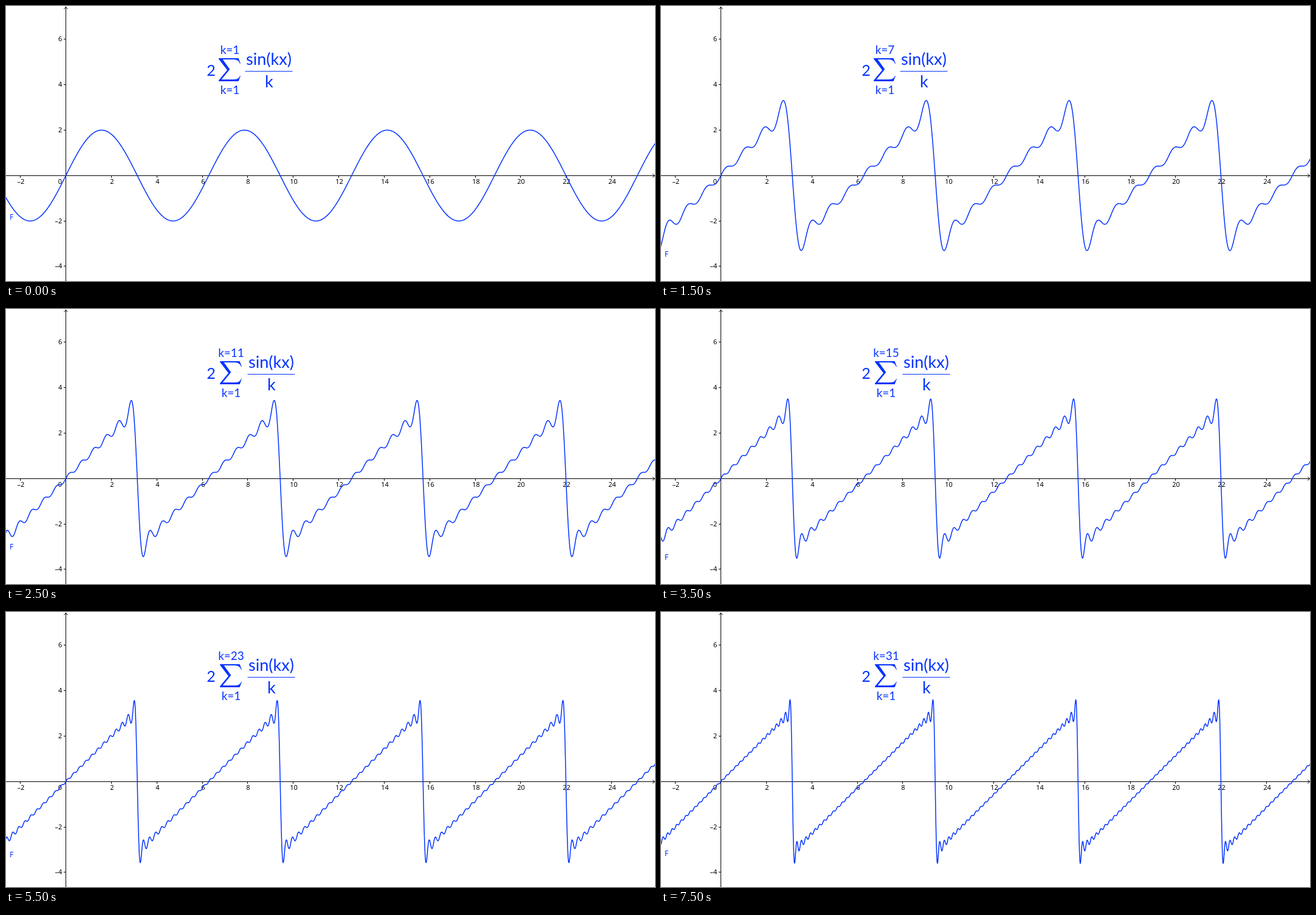
Write an HTML page with a canvas that moves like this. It is 1068x453 px and loops after 8000 ms.

```html
<!DOCTYPE html>
<html lang="en">
<head>
<meta charset="utf-8">
<title>Partial sums of a sawtooth wave</title>
<style>
  html, body { margin: 0; width: 100%; height: 100%; overflow: hidden; background: #fff; }
  canvas { display: block; width: 1068px; height: 453px; }
</style>
</head>
<body>
<canvas id="stage"></canvas>
<script>
const W = 1068, H = 453;
const STEP = 500, LOOP = 8000;
const UNIT = 37.42, X0 = 98.5, Y0 = 279.3;
const BLUE = '#0433ff', BLACK = '#000';
const AXIS_FONT = '11px "Noto Sans", "Open Sans", sans-serif';
const MATH = 'Lato, "Open Sans", sans-serif';

const canvas = document.getElementById('stage');
const ctx = canvas.getContext('2d');
const dpr = window.devicePixelRatio || 1;
canvas.width = W * dpr;
canvas.height = H * dpr;

const sigma = new Path2D(
  'M350 86H382.6L386 95H385C382.6 89.4 380 88 372 88H356.6L368.3 104.2' +
  'L354.6 121H372C380 121 383 120 385 115H386L382.6 124H350V122.6L364 105.6L350 87.2Z');

const snap = v => Math.floor(v) + 0.5;

function text(str, x, y, font, color, align = 'center') {
  ctx.font = font;
  ctx.fillStyle = color;
  ctx.textAlign = align;
  ctx.fillText(str, x, y);
}

function stroke(color, width, ...points) {
  ctx.strokeStyle = color;
  ctx.lineWidth = width;
  ctx.beginPath();
  points.forEach(([x, y]) => ctx.lineTo(x, y));
  ctx.stroke();
}

// Partial sum 2 * sum (-1)^(k+1) sin(kx) / k, which tends to x on (-pi, pi)
function wave(x, n) {
  let sum = 0;
  for (let k = 1; k <= n; k++) sum += (k % 2 ? 2 : -2) * Math.sin(k * x) / k;
  return sum;
}

const waveY = (px, n) => Y0 - UNIT * wave((px - X0) / UNIT, n);

function drawAxes() {
  const ay = snap(Y0);
  stroke(BLACK, 1, [0, ay], [W, ay]);
  stroke(BLACK, 1, [X0, 1], [X0, H]);
  stroke(BLACK, 1, [W - 4, ay - 3], [W - 0.7, ay], [W - 4, ay + 3]);
  stroke(BLACK, 1, [X0 - 3, 5], [X0, 1.7], [X0 + 3, 5]);

  const label = v => (v < 0 ? '\u2013' : '') + Math.abs(v);
  for (let v = -2; v <= 24; v += 2) {
    if (!v) continue;
    const x = snap(X0 + v * UNIT);
    stroke(BLACK, 1, [x, ay], [x, ay + 3.5]);
    text(label(v), x + 1, 293, AXIS_FONT, BLACK);
  }
  for (let v = -4; v <= 6; v += 2) {
    if (!v) continue;
    const y = snap(Y0 - v * UNIT);
    stroke(BLACK, 1, [X0 - 3.5, y], [X0, y]);
    text(label(v), 92.3, Math.floor(y) + 4, AXIS_FONT, BLACK, 'right');
  }
  text('0', 89, 293, AXIS_FONT, BLACK);
}

function drawWave(n) {
  const points = [];
  for (let px = -1; px <= W + 1; px += 0.5) points.push([px, waveY(px, n)]);
  ctx.lineJoin = 'round';
  stroke(BLUE, 1.5, ...points);
  text('F', 6, Math.round(waveY(3, n) + 31), '12px "Noto Sans", "Open Sans", sans-serif', BLUE, 'left');
}

function drawFormula(n) {
  const shift = n > 9 ? 2 : 0;
  text('2', 337.6, 115, '25px ' + MATH, BLUE);
  ctx.save();
  ctx.translate(shift, 0);
  ctx.fill(sigma);
  text('k=' + n, 368.5, 79, '19px ' + MATH, BLUE);
  text('k=1', 368.5, 145, '19px ' + MATH, BLUE);
  ctx.translate(shift, 0);
  text('sin(kx)', 432.5, 97, '27px ' + MATH, BLUE);
  stroke(BLUE, 1.2, [393.5, 107.5], [471.5, 107.5]);
  text('k', 432.8, 134, '27px ' + MATH, BLUE);
  ctx.restore();
}

const start = performance.now();

function frame(now) {
  const t = Math.max(0, now - start) % LOOP;
  const n = 1 + 2 * Math.floor(t / STEP);
  ctx.setTransform(dpr, 0, 0, dpr, 0, 0);
  ctx.fillStyle = '#fff';
  ctx.fillRect(0, 0, W, H);
  drawAxes();
  drawWave(n);
  drawFormula(n);
  requestAnimationFrame(frame);
}
requestAnimationFrame(frame);
</script>
</body>
</html>
```
